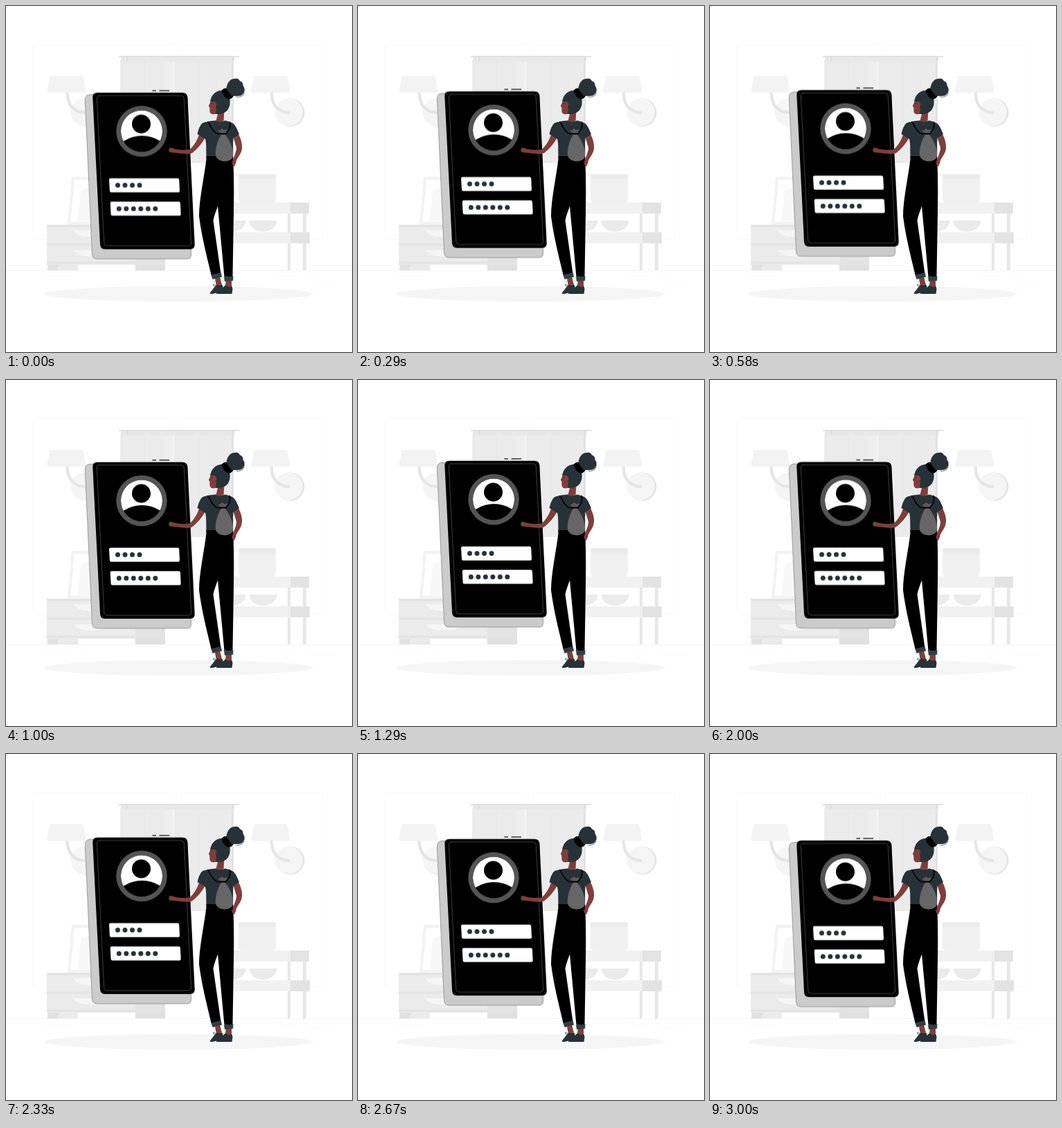
These frames come from a looping animation (500x500 px, 3040 ms). An HTML page:

```html
<!DOCTYPE html>
<html lang="en">
<head>
<meta charset="utf-8">
<title>Sign in</title>
<style>
  html, body { margin: 0; width: 100%; height: 100%; overflow: hidden; background: #fff; }
  svg { display: block; width: 100vw; height: 100vh; }
  .phone { animation: float 3040ms linear infinite; }
  @keyframes float {
    0%, 100% { transform: translateY(.5px); }
    50% { transform: translateY(-9.5px); }
  }
  .skin { fill: #7f3e3b; }
  .dark { fill: #263238; }
  .line { fill: none; stroke-linecap: round; stroke-linejoin: round; }
</style>
</head>
<body>
<svg viewBox="0 0 500 500">
  <defs>
    <clipPath id="face"><circle cx="196" cy="180.5" r="30"/></clipPath>
    <g id="lamp">
      <circle cx="411" cy="154" r="20.5" fill="#e6e6e6"/>
      <circle cx="408.5" cy="153.5" r="20" fill="#f5f5f5"/>
      <path class="line" d="M383.5 125C384 141 391 153 408 154" stroke="#e6e6e6" stroke-width="4.5"/>
      <path d="M360 101H404Q406 101 407 104L410 122Q410 125.5 407 125.5H357Q354 125.5 354.5 122L358 103Q358.5 101 360 101Z" fill="#f3f3f3"/>
    </g>
  </defs>

  <!-- room -->
  <g fill="none" stroke="#f9f9f9">
    <rect x="39.5" y="55.5" width="203" height="282"/>
    <rect x="254.5" y="55.5" width="203" height="282"/>
  </g>
  <path d="M0 382.5H500" stroke="#f4f4f4"/>
  <path d="M390 390.5H420M433 394.5H448M447 398.5H475M52 390.5H95M105 393.5H112" stroke="#fbfbfb"/>

  <rect x="165" y="78" width="164" height="149" fill="#ebebeb"/>
  <path d="M228 78H243V227H228Z" fill="#eee"/>
  <path d="M242 80V227" stroke="#f7f7f7" stroke-width="1.500"/>
  <path d="M200.5 80V227M278.5 80V227M303.5 80V227" stroke="#e6e6e6"/>
  <path d="M326 78H329V227H326Z" fill="#e3e3e3"/>
  <rect x="163" y="72" width="174" height="2" fill="#e1e1e1"/>
  <rect x="166" y="74" width="164" height="6" fill="#e8e8e8"/>
  <path d="M175 72V79M328 72V79" stroke="#dfdfdf" stroke-width="2"/>

  <use href="#lamp"/>
  <use href="#lamp" x="-295"/>

  <path d="M97 249H170L163 314H91Z" fill="#fff" stroke="#f3f3f3" stroke-width="4.5"/>
  <path d="M108 266L122 262V311H104Z" fill="#f7f7f7"/>
  <path d="M60 374H77L74 382H60ZM187 374H230V382H187Z" fill="#e1e1e1"/>
  <path d="M77 374H104V382H74Z" fill="#eaeaea"/>
  <rect x="59" y="316" width="171" height="58" fill="#ebebeb"/>
  <rect x="187" y="316" width="43" height="58" fill="#e3e3e3"/>
  <path d="M59 318H187M59 345H187M59 371H187" stroke="#e3e3e3" stroke-width="3"/>
  <path d="M97 324H150Q147 334 124 334Q102 334 97 324ZM97 353H150Q147 362 124 362Q102 362 97 353Z" fill="#f5f5f5"/>

  <rect x="336" y="246" width="54" height="38" rx="5" fill="#f0f0f0"/>
  <rect x="336" y="243" width="54" height="7" rx="3" fill="#ebebeb"/>
  <path d="M407 300H411V382H407ZM429 300H434V382H429Z" fill="#e8e8e8"/>
  <path d="M320 284H411V300H320ZM320 327H411V343H320Z" fill="#f1f1f1"/>
  <path d="M411 284H438V300H411ZM411 327H439V343H411Z" fill="#e3e3e3"/>
  <path d="M351 310H392C390 321 382 326 371.5 326S353 321 351 310ZM306 310H347C345 321 337 326 326.5 326S308 321 306 310Z" fill="#ebebeb"/>

  <ellipse cx="249.5" cy="416" rx="194" ry="11" fill="#f5f5f5"/>

  <g class="phone">
    <path d="M211.5 121.8H217M221.5 121.8H236" stroke="#333" stroke-width="1.5"/>
    <path d="M130 127.5H121Q114 128 114.3 136L124.5 358Q125 365 132 365H262Q267.5 365 267.5 359L262 130Z" fill="#cbcbcb" stroke="#555" stroke-width=".5"/>
    <path d="M132 124.700H255Q262 124.700 262.4 132L272.7 344Q273 351 266 351H143Q136.3 351 136 344L125.3 132Q125 124.700 132 124.700Z"/>
    <path class="line" d="M135 129H253Q257 129 257.3 133L267.6 342Q267.8 346 264 346H146Q142 346 141.7 342L131.3 133Q131 129 135 129Z" stroke="#6a6a6a" stroke-width=".6"/>
    <circle cx="196" cy="180.5" r="36.8" fill="#545454"/>
    <g clip-path="url(#face)">
      <circle cx="196" cy="180.5" r="30" fill="#fff"/>
      <circle cx="195.5" cy="170" r="13.5"/>
      <ellipse cx="196.5" cy="212" rx="36" ry="25"/>
    </g>
    <g fill="#fff">
      <path id="field" d="M151 248.5H248Q250 248.5 250.2 250.8L251 266.5Q251 268.7 249 268.7H152Q150 268.700 149.9 266.500L149 250.800Q149 248.500 151 248.500Z"/>
      <use href="#field" x="1.7" y="33.7"/>
    </g>
    <g class="line" stroke="#263238" stroke-width="7" stroke-dasharray="0 10.5">
      <path d="M161.5 258.5H194"/>
      <path d="M163.3 292.4H217"/>
    </g>
  </g>

  <!-- woman -->
  <g>
    <path class="skin" d="M302 394L309 391L312.5 405H304ZM318 396H326V407H316.5Z"/>
    <path class="dark" d="M295 414C299 410 302 405 305 402.5Q309 405 313 403L314 410C308 412 303 416 297 416Q294 416 295 414Z"/>
    <path class="dark" d="M304 414C310 411 314 406 317 403.5Q321 407 326.5 405L327.5 409L326.5 416H306Q303 416 304 414Z"/>
    <path class="line" d="M304 405Q299 400 299.5 404Q300 406 304 405Q299 408 300 409" stroke="#263238" stroke-width=".8"/>

    <path d="M290 218H328C329.5 240 329.5 275 329 300L327.5 391.500H315.5L306 289C304 296 300.5 303 299.5 310C303 335 307 362 310.5 387L297 390.500C291 365 283 335 279 304C279 280 286 250 290 218Z"/>
    <path d="M296.500 388.500L310.5 385L312 391.5L298.5 395ZM315 391.5L328.500 390.5L328 397L316 398Z" fill="#2f3e46"/>

    <path class="skin" d="M279 186C275 197 270 204 265 207.5C256 208.5 248 208 242 206L237 204.5L235 208L236.5 211.5L243 212C252 213 262 215 269 212.5C277 206 283 199 288 190Z"/>
    <path class="skin" d="M328 188L335.500 184C341 195 342 202 340.500 209C338 217 332 222 332.5 226L330 232L326.5 228.5C327 222 333 212 333 205Z"/>

    <path class="dark" d="M303 165.5Q310 168 317 165.5L325 168Q330 170 333 176L337 185L328.500 191C327.500 201 328.500 210 328 219H289.5C289 210 290 200 288 192L276.5 185Q279 174 283 170Q286 167 303 165.5Z"/>
    <path d="M289.5 217H328.200V221H289.5Z"/>

    <path class="line" d="M292 167.500C296 174 299 183 307 185M323 167.500C325.500 174 322 181 317 185" stroke="#000" stroke-width="1.6"/>
    <path d="M311 186C305 195 302 207 303 216C305 227 326 227 328 217C329 207 324 195 317 186Z" fill="#666"/>
    <path d="M310 184L306 179.5L310 179.5L312 176.5L315 179L320 178.5L317 184Z" fill="#5a5a5a"/>
    <path d="M308 184.5H318.5" stroke="#000" stroke-width="1.8"/>

    <path class="skin" d="M305 150H315.5L314.5 166Q309 169 303.5 166L306 156Z"/>
    <path class="skin" d="M295.5 135L295 140L292.8 144L294.3 147L294.5 153Q296 157 300 156.5L307 155V136Z"/>
    <path class="dark" d="M295.5 138C296 129 303 122 312 122C320 123 325 131 323.5 142C322 152 315 157 303 156C304 151 304.5 148 303 146Q306 141 302 138Z"/>
    <path class="skin" d="M300 141Q304 139 304 143Q303.5 147 300.5 146Z"/>
    <path class="line" d="M295.5 141L297.5 140.5" stroke="#263238" stroke-width=".8"/>
    <path d="M311.500 122Q316 117 321 119.500L329 129Q328 134 321 135Q313 131 311.500 122Z"/>
    <path class="dark" d="M318.500 120C319 111 324 105 331 105Q336 104 338 108.500Q343 110 342.500 115Q346 120 344 125Q342 130.500 336 130C331 131 328 129 326 130Z"/>
    <path class="line" d="M333 130.500Q341 131.500 343.500 126" stroke="#fff" stroke-width=".8"/>
    <path class="line" d="M333 131.500Q342 132.500 344.200 126" stroke="#263238" stroke-width=".7"/>
  </g>
</svg>
</body>
</html>
```
